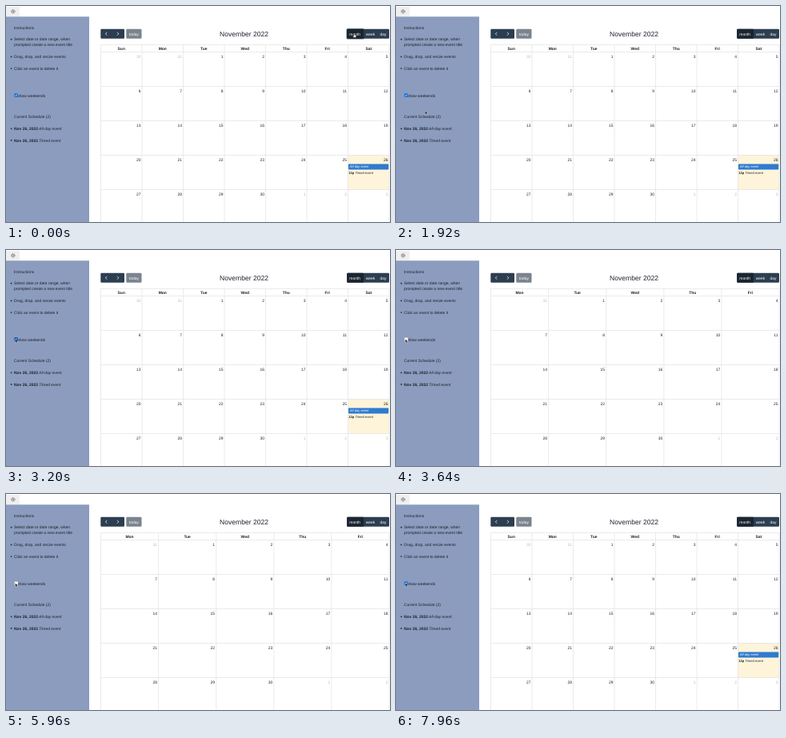
These frames come from a looping animation (480 px wide and 270 px high, 8 s). An HTML page:

```html
<!DOCTYPE html>
<html lang="en">
<head>
<meta charset="utf-8">
<title>Calendar</title>
<style>
html, body { margin: 0; width: 100%; height: 100%; overflow: hidden; background: #fff; }
svg { display: block; width: 100vw; height: 100vh; }
text { font: 4.95px "Liberation Sans", Arial, sans-serif; fill: #1c222c; text-rendering: geometricPrecision; white-space: pre; }
.b { font-weight: bold; }
.i { font-style: italic; }
.mid { text-anchor: middle; }
.end { text-anchor: end; }
.btn { fill: #fff; }
.title { font-size: 8.57px; }
.small { font-size: 4.1px; }
.other { opacity: .3; }
.grid { fill: none; stroke: #ddd; stroke-width: .6; }
</style>
</head>
<body>
<svg id="stage" viewBox="0 0 480 270">
  <rect width="480" height="270" fill="#fff"/>
  <rect y="1" width="17" height="12" fill="#efefef"/>
  <g fill="none" stroke="#333" stroke-width=".6">
    <circle cx="8.8" cy="6.8" r="1.3"/>
    <circle cx="8.8" cy="6.8" r="2.4" stroke-width=".9" stroke-dasharray=".6 1.285"/>
  </g>
  <rect y="13.3" width="104" height="256.7" fill="#8c9cbe"/>
  <g id="side"></g>
  <g id="bar"></g>
  <g id="full"></g>
  <g id="work"></g>
  <g id="box">
    <rect id="boxFill" x="10.3" y="109.2" width="4.7" height="4.7" rx=".8" stroke-width=".4"/>
    <path id="tick" d="M11.5 111.7l.9 1 1.5-2.2" fill="none" stroke="#fff" stroke-width=".7"/>
  </g>
  <path id="arrow" d="M0 0V4.7L1.1 3.7 1.9 5.5 2.7 5.1 1.9 3.4H3.4Z" fill="#111" stroke="#fff" stroke-width=".4"/>
  <path id="hand" d="M-.5 .5Q0-.2 .5 .5V2.3L2 2.7Q2.6 3 2.4 4L1.8 5.8H-.7L-2 3.7Q-1.8 3-1.2 3.3L-.5 3.9Z" fill="#fff" stroke="#111" stroke-width=".45"/>
</svg>
<script>
const LOOP = 8000, STEP = 40;
const LEFT = 118.5, RIGHT = 479, HEAD = 48.5, TOP = 57.5, ROW = 43;
const DAYS = ["Sun", "Mon", "Tue", "Wed", "Thu", "Fri", "Sat"];
const $ = id => document.getElementById(id);

function add(parent, tag, attrs, text) {
  const el = document.createElementNS("http://www.w3.org/2000/svg", tag);
  for (const k in attrs) el.setAttribute(k, attrs[k]);
  if (text) el.textContent = text;
  parent.appendChild(el);
  return el;
}
const write = (parent, x, y, str, cls = "") => add(parent, "text", { x, y, class: cls }, str);
const rect = (parent, x, y, width, height, fill, rx = 0) =>
  add(parent, "rect", { x, y, width, height, fill, rx });

function drawSide() {
  const g = $("side");
  const lines = [
    [28.8, "Instructions"],
    [43.3, "Select date or date range, when", 1],
    [50.3, "prompted create a new event title"],
    [65, "Drag, drop, and resize events", 1],
    [79.6, "Click an event to delete it", 1],
    [140.3, "Current Schedule (2)"]
  ];
  const bullet = y => add(g, "circle", { cx: 6.6, cy: y - 1.6, r: .85, fill: "#1c222c" });
  for (const [y, str, dot] of lines) {
    write(g, 10, y, str);
    if (dot) bullet(y);
  }
  write(g, 14.2, 113.5, "show weekends");
  return [[154.9, "All-day event"], [169.5, "Timed event"]].map(([y, name]) => {
    bullet(y);
    const t = write(g, 10, y, "");
    add(t, "tspan", { class: "b" }, "Nov 26, 2022");
    add(t, "tspan", { class: "i" }, " " + name);
  });
}

function drawBar() {
  const g = $("bar"), dark = "#2c3e50", y = 36.5;
  rect(g, 118.3, 28.8, 29.7, 12, dark, 1.2);
  for (const [x, d] of [[125.4, -1], [139.8, 1]])
    add(g, "path", { d: `M${x - d * .8} 32.9l${d * 1.8} 1.9l${-d * 1.8} 1.9`, fill: "none", stroke: "#fff", "stroke-width": .75 });
  rect(g, 150.3, 28.8, 19.2, 12, "#7b848e", 1.2);
  write(g, 159.9, y, "today", "btn mid");
  write(g, 297.5, 37.6, "November 2022", "title mid");
  add(g, "rect", { id: "ring", x: 425.3, y: 27.9, width: 22.8, height: 13.8, rx: 2, fill: "#8b98a5" });
  rect(g, 426.2, 28.8, 52.8, 12, dark, 1.2);
  rect(g, 426.2, 28.8, 20.9, 12, "#1a252f", 1.2);
  for (const [x, s] of [[436.2, "month"], [455.5, "week"], [471.4, "day"]]) write(g, x, y, s, "btn mid");
}

// first and last are weekday indexes, Sunday = 0
function drawMonth(g, first, last) {
  const cols = last - first + 1, w = (RIGHT - LEFT) / cols;
  rect(g, LEFT, HEAD, RIGHT - LEFT, 270 - HEAD, "#fff");
  if (last === 6) rect(g, RIGHT - w, TOP + 3 * ROW, w, ROW, "#fdf4da");
  let d = `M${LEFT} ${HEAD}H${RIGHT}`;
  for (let c = 0; c <= cols; c++) d += `M${LEFT + c * w} ${HEAD}V270`;
  for (let r = 0; r < 5; r++) d += `M${LEFT} ${TOP + r * ROW}H${RIGHT}`;
  add(g, "path", { d, class: "grid" });
  for (let c = 0; c < cols; c++) {
    write(g, LEFT + (c + .5) * w, 54.8, DAYS[first + c], "b mid");
    for (let r = 0; r < 5; r++) {
      const n = r * 7 + first + c - 1;
      const day = n < 1 ? n + 31 : n > 30 ? n - 30 : n;
      write(g, LEFT + (c + 1) * w - 1.6, TOP + r * ROW + 7, day, n === day ? "end" : "end other");
    }
  }
  if (last < 6) return;
  rect(g, 428, 197.5, 50.2, 6.9, "#2f7bcf", .8);
  write(g, 429.8, 202.4, "All-day event", "btn small i");
  write(g, 428.2, 210.2, "12p", "small b");
  write(g, 436.4, 210.2, "Timed event", "small i");
}

drawSide();
drawBar();
drawMonth($("full"), 0, 6);
drawMonth($("work"), 1, 5);

// time, x, y of the pointer tip
const PATH = [
  [0, 435.4, 33.8], [480, 435.4, 33.8], [960, 401, 33], [1160, 401, 33],
  [1720, 36.6, 131.2], [1880, 36.6, 131.2], [2560, 11.6, 111.2], [LOOP, 11.6, 111.2]
];
// press and release times of each click on the checkbox
const CLICKS = [[3200, 3520], [4320, 4640], [5720, 5920], [7440, 7720]];

function pointer(t) {
  const i = PATH.findIndex(p => p[0] > t);
  const [t0, x0, y0] = PATH[i - 1], [t1, x1, y1] = PATH[i];
  const p = (t - t0) / (t1 - t0), e = p * p * (3 - 2 * p);
  return [x0 + (x1 - x0) * e, y0 + (y1 - y0) * e];
}

const show = (id, on) => $(id).setAttribute("visibility", on ? "visible" : "hidden");

function render(t) {
  const [x, y] = pointer(t);
  const over = x > 426;
  for (const id of ["arrow", "hand"]) $(id).setAttribute("transform", `translate(${x} ${y})`);
  show("hand", over);
  show("arrow", !over);
  show("ring", t < 520);

  const checked = CLICKS.filter(c => t >= c[1]).length % 2 === 0;
  const pressed = CLICKS.some(c => t >= c[0] && t < c[1]);
  show("full", checked);
  show("work", !checked);
  show("tick", checked);
  $("boxFill").setAttribute("fill", checked ? (pressed ? "#0b55b8" : "#1672de") : pressed ? "#d4d4d4" : "#fff");
  $("boxFill").setAttribute("stroke", checked ? "none" : "#777");
}

const start = performance.now();
function frame() {
  const t = (performance.now() - start) % LOOP;
  render(Math.floor(t / STEP) * STEP);
  requestAnimationFrame(frame);
}
frame();
</script>
</body>
</html>
```
